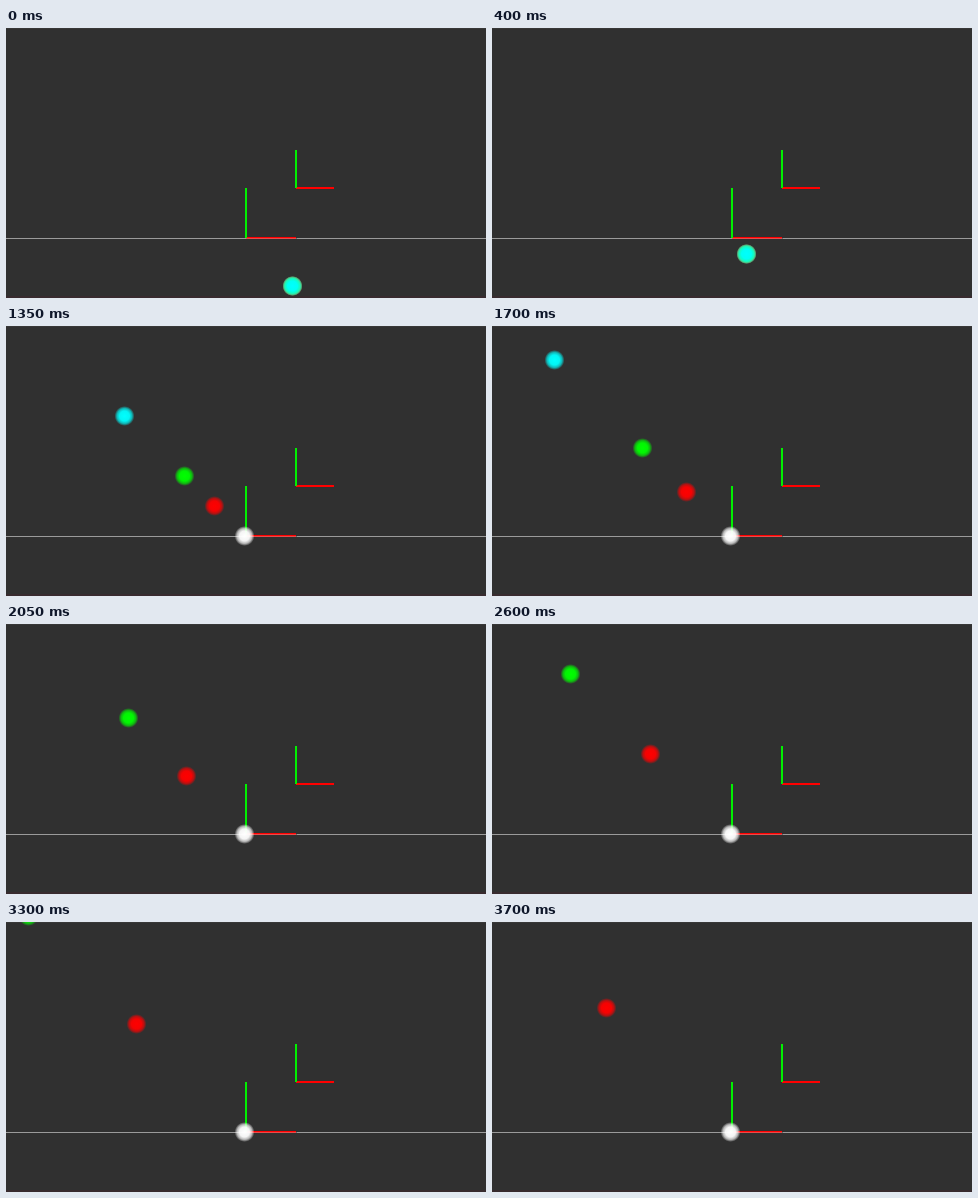
Animation, 480 px wide and 270 px high, one loop 3750 ms. Source, as an HTML page with a canvas:

```html
<!DOCTYPE html>
<html lang="en">
<head>
<meta charset="utf-8">
<title>Particle velocity</title>
<style>
html, body { margin: 0; width: 100%; height: 100%; overflow: hidden; background: #303030; }
canvas { display: block; }
</style>
</head>
<body>
<canvas id="stage" width="480" height="270"></canvas>
<script>
const ctx = document.getElementById('stage').getContext('2d');
const LOOP = 3750, STEP = 50, HIT = 600;
const SPEED = 0.08; // px per ms on each axis
const RADIUS = 10;
const ORIGIN = { x: 238.5, y: 210 };

// gain scales the velocity once the balls reach the origin
const balls = [
  { rgb: '255,0,0', gain: 0.5 },
  { rgb: '255,255,255', gain: 0 },
  { rgb: '0,255,0', gain: 1 },
  { rgb: '0,255,255', gain: 2 }
];

function rect(color, x, y, w, h) {
  ctx.fillStyle = color;
  ctx.fillRect(x, y, w, h);
}

function axes(x, y, size) {
  rect('#ff0000', x, y - 1, size, 2);
  rect('#00f000', x - 1, y - size, 2, size);
}

function drawBall({ rgb, gain }, t) {
  const d = (t - HIT) * SPEED * (t < HIT ? 1 : gain);
  const x = ORIGIN.x - d, y = ORIGIN.y - d;
  const glow = ctx.createRadialGradient(x, y, 0, x, y, RADIUS);
  glow.addColorStop(0, `rgba(${rgb},1)`);
  glow.addColorStop(0.5, `rgba(${rgb},0.95)`);
  glow.addColorStop(0.75, `rgba(${rgb},0.65)`);
  glow.addColorStop(1, `rgba(${rgb},0)`);
  ctx.fillStyle = glow;
  ctx.beginPath();
  ctx.arc(x, y, RADIUS, 0, Math.PI * 2);
  ctx.fill();
}

function draw(t) {
  rect('#303030', 0, 0, 480, 270);
  rect('#383838', 0, 0, 480, 1);
  rect('#382b2f', 0, 268, 480, 2);
  axes(240, 210, 50);
  rect('rgba(190,190,190,0.75)', 0, 210, 240, 1);
  rect('rgba(190,190,190,0.4)', 240, 210, 51, 1);
  rect('rgba(190,190,190,0.75)', 291, 210, 189, 1);
  balls.forEach(ball => drawBall(ball, t));
  axes(290, 160, 38);
}

function tick() {
  const t = performance.now() % LOOP;
  draw(Math.floor(t / STEP) * STEP);
  requestAnimationFrame(tick);
}
tick();
</script>
</body>
</html>
```
